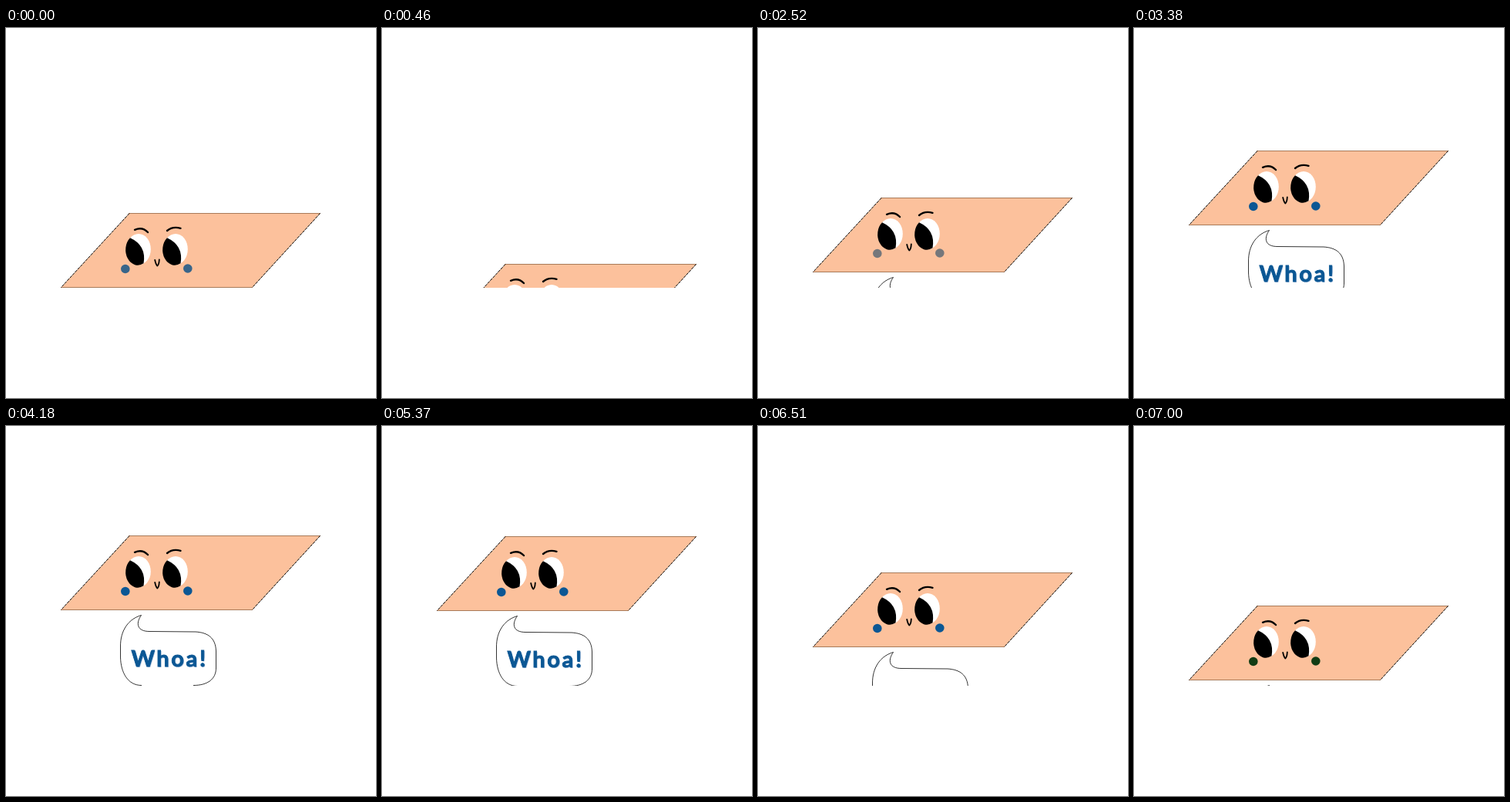
These frames come from a looping animation (480x480 px, 7.07 s). An HTML page:

```html
<!DOCTYPE html>
<html>
<head>
<meta charset="utf-8">
<style>
  html, body { margin: 0; width: 100%; height: 100%; overflow: hidden; background: #fff; }
  svg { display: block; }
  text { font: 700 29px Lato, sans-serif; letter-spacing: 2.6px; }
  .line { fill: none; stroke: #000; stroke-linecap: round; }
</style>
</head>
<body>
<!-- The stage ends at the floor line, which hides everything below it -->
<svg width="480" height="337">
  <defs>
    <g id="eye">
      <ellipse cx="172" cy="47" rx="15.8" ry="20" fill="#fff"/>
      <path d="M161 32.2Q182.500 42 178.500 65.300A15.8 20 0 0 1 161 32.2"/>
    </g>
  </defs>
  <g id="hero">
    <path d="M160 .5H407.500L319.500 96.500H71.500Z" fill="#fcc19c"/>
    <path d="M159 .5H408M71 96.500H320" stroke="#a87a58"/>
    <path d="M160 .5L71.500 96.500M407.500 .5L319.500 96.500" stroke="#000" stroke-dasharray="4 1"/>
    <use href="#eye"/>
    <use href="#eye" x="48"/>
    <path class="line" stroke-width="2.400" d="M167 21.800Q177 17.500 184 25M209 23Q216 17 226.500 19.800"/>
    <path class="line" stroke-width="1.800" stroke-linejoin="round" d="M193.200 61Q194.500 67 196.300 68.500Q198.500 67 198.800 60.500"/>
    <g id="cheeks">
      <circle cx="154.800" cy="72.500" r="5.800"/>
      <circle cx="235.800" cy="72" r="5.800"/>
    </g>
    <path d="M176 194.500C158 194.500 149 178 148.500 158V145C148 122 160 108 175.500 103.500C168 114 170 124.500 186 124.500L246 125C262 126 272 133 272.500 150V172C272.500 186 262 194.500 243 194.500"
          fill="#fff" stroke="#000" stroke-width=".8"/>
    <text x="163.500" y="170.500" fill="#a9bfdc">Whoa!</text>
    <text x="162.500" y="169.500" fill="#0b5794" stroke="#0b5794" stroke-width=".9">Whoa!</text>
  </g>
</svg>
<script>
const LOOP = 7070, RISE = 1750, GONE = 7740;

// [time, top edge of the card]; the fall runs on past the loop point
const keys = [
  [RISE, 336], [2450, 226], [2520, 220], [3180, 167], [3380, 159], [3980, 143], [4180, 142],
  [5170, 142], [5970, 159], [6720, 206], [7000, 233], [7070, 240], [7710, 335]
];
// [from, ms per pose]
const cadence = [[RISE, 30], [2380, 70], [3080, 100], [4180, 100], [5270, 100], [6370, 70], [7140, 30]];
const tints = [[RISE, '#75777b'], [2700, '#0b5794'], [6790, '#123c14'], [7070, '#38658a']];

const lastBefore = (list, t) => list.filter(k => k[0] <= t).pop();

// Monotone cubic interpolation
const last = keys.length - 1;
const slopes = keys.slice(1).map(([t, y], i) => (y - keys[i][1]) / (t - keys[i][0]));
const tangents = keys.map((k, i) => {
  const a = slopes[i - 1], b = slopes[i];
  return a * b > 0 ? 2 * a * b / (a + b) : 0;
});
tangents[0] = 1.5 * slopes[0] - 0.5 * tangents[1];
tangents[last] = 1.5 * slopes[last - 1] - 0.5 * tangents[last - 1];

function topAt(t) {
  if (t >= GONE) return 400;
  const i = Math.min(keys.indexOf(lastBefore(keys, t)), last - 1);
  const [t0, y0] = keys[i], [t1, y1] = keys[i + 1];
  const h = t1 - t0, u = (t - t0) / h, v = 1 - u;
  return y0 * v * v * (1 + 2 * u) + y1 * u * u * (3 - 2 * u)
    + h * u * v * (tangents[i] * v - tangents[i + 1] * u);
}

const hero = document.getElementById('hero');
const cheeks = document.getElementById('cheeks');
const start = performance.now();

function draw() {
  let t = (performance.now() - start) % LOOP;
  if (t < RISE) t += LOOP;
  const [from, step] = lastBefore(cadence, t);
  t = from + Math.floor((t - from) / step) * step;
  hero.setAttribute('transform', `translate(0 ${Math.round(topAt(t))})`);
  cheeks.setAttribute('fill', lastBefore(tints, t)[1]);
  requestAnimationFrame(draw);
}
draw();
</script>
</body>
</html>
```
